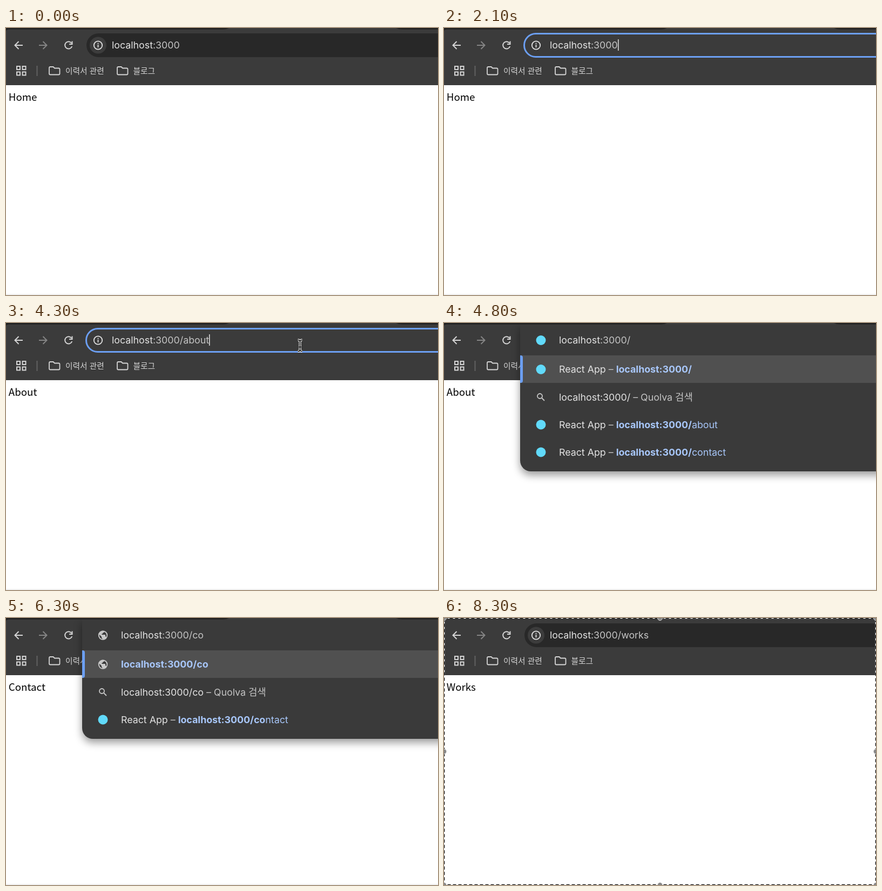
Recreate the animation shown at these times as an HTML page. Size 800 by 495 pixels, loop 9300 ms.

```html
<!DOCTYPE html>
<html lang="ko">
<head>
<meta charset="utf-8">
<title>Browser routing</title>
<style>
  html, body { margin: 0; width: 100%; height: 100%; overflow: hidden; background: #fff; }
  #stage { position: relative; width: 800px; height: 495px; overflow: hidden; }
  #stage svg, #live, #live div, p { position: absolute; }
  #stage svg, #live { left: 0; top: 0; width: 800px; height: 495px; }
  p { margin: 0; font: 17.8px/24px Inter, "Noto Sans CJK KR", sans-serif; color: #e3e3e3; white-space: pre; }
  .page { font: 18.7px/24px "Noto Sans CJK KR", "Noto Sans", sans-serif; color: #000; }
  .mark { font: 14.7px/24px "Noto Sans CJK KR", sans-serif; color: #d5d5d5; }
  .dim { color: #c4c4c4; }
  .link { color: #a8c7fa; }
  .sel { background: #41648f; color: #d3dbe4; }
  .caret { box-shadow: 1.5px 0 #e3e3e3; }
  .bar { left: 149px; top: 10px; width: 680px; height: 44px; border-radius: 22px; background: #282828; }
  .hover { background: #343434; }
  .focus { left: 147px; top: 9px; height: 40px; border: 3px solid #6c9ff3; border-radius: 23px; background: #3b3b3b; }
  .panel { left: 141px; top: 3px; width: 680px; background: #3a3a3a; border-radius: 0 0 0 20px;
           box-shadow: 0 7px 15px rgba(0, 0, 0, .4); clip-path: inset(0 0 -40px -20px); }
  .active { left: 141px; top: 60px; width: 659px; height: 51px; background: #505050; }
  .active::before { content: ""; position: absolute; width: 5px; height: 51px; background: #6c9ff3; border-radius: 0 4px 4px 0; }
</style>
</head>
<body>
<div id="stage">
  <svg fill="none" stroke="#d5d5d5" stroke-width="2">
    <g stroke="none">
      <path fill="#3b3b3b" d="M0 0H800V106H0z"/>
      <path fill="#1f1f1f" d="M0 0H413Q408 2.5 402 2.5H6Q0 2.5 0 6zM722 0H800V2.5H734Q727 2.5 722 0z"/>
      <path fill="#e4e4e4" d="M0 493.5H800v1H0z"/>
    </g>
    <path d="M31 32H17M23.500 25l-7 7 7 7"/>
    <path stroke="#858585" d="M61 32H75M68.500 25l7 7-7 7"/>
    <path d="M121.300 28A6.700 6.700 0 1 0 122.200 34M122.500 24.500V30H117"/>
    <path d="M20 71h6v6h-6zM30.500 71h6v6h-6zM20 81.500h6v6h-6zM30.500 81.500h6v6h-6z"/>
    <path stroke="#626262" d="M57.500 70V89"/>
    <path id="folder" stroke-width="1.800" d="M82 72h5.500l2.500 2.500h7.500q2 0 2 2v8q0 2-2 2H82q-2 0-2-2V74q0-2 2-2z"/>
    <use href="#folder" x="126"/>
  </svg>
  <p class="mark" style="left:110px;top:66.500px">이력서 관련</p>
  <p class="mark" style="left:235.500px;top:66.500px">블로그</p>
  <div id="live"></div>
  <svg id="overlay"></svg>
</div>
<script>
const LOOP = 9300, STEP = 100, HOST = 'localhost', PORT = ':3000';
const ROW_Y = [86, 137.5, 188.5, 239.5];
const live = document.getElementById('live');
const overlay = document.getElementById('overlay');

const timeline = [];
const at = (time, change) => timeline.push([time, change]);
const type = (time, typed, rest = '') => at(time, { mode: 'list', typed, rest });
const visit = (time, page) => at(time, { mode: 'idle', page, path: page === 'Home' ? '' : '/' + page.toLowerCase() });
// Held backspace: one letter per step until only the slash remains.
const erase = (time, path) => {
  for (let n = path.length - 1; n > 0; n--, time += STEP) type(time, path.slice(0, n));
};

visit(0, 'Home');
at(1000, { mode: 'hover' });
at(1400, { mode: 'select' });
at(2000, { mode: 'caret' });
type(2300, '/');
type(2700, '/a', 'bout');
visit(3100, 'About');
at(3700, { mode: 'hover' });
at(4000, { mode: 'select' });
at(4200, { mode: 'caret' });
erase(4400, '/about');
type(4900, '/c', 'ontact');
type(5000, '/con', 'tact');
visit(5100, 'Contact');
at(5700, { mode: 'select' });
at(5800, { mode: 'caret' });
erase(5900, '/contact');
type(6700, '/w', 'orks');
type(6800, '/wo', 'rks');
type(6900, '/wor', 'ks');
visit(7000, 'Works');

// Pointer: start, end, from x, y, to x, y
const moves = [
  [500, 1100, 780, 284, 600, 36], [1100, 1400, 600, 36, 600, 36], [1400, 1600, 600, 36, 790, 145],
  [3500, 3900, 790, 60, 544.5, 42], [3900, 4400, 544.5, 42, 544.5, 42],
  [5700, 5900, 543, 41, 543, 41], [6900, 7500, 543, 41, 543, 41], [7500, 7600, 577, 30, 577, 30]
];

const stateAt = t => Object.assign({}, ...timeline.filter(([time]) => time <= t).map(([, change]) => change));
const text = (x, y, html, cls = '') => `<p class="${cls}" style="left:${x}px;top:${y - 12}px">${html}</p>`;
const span = (cls, html) => `<span class="${cls}">${html}</span>`;
const svg = body => `<svg fill="none" stroke="#c7c7c7">${body}</svg>`;

const appIcon = y => svg(`<circle cx="179.500" cy="${y}" r="9" fill="#61dafb" stroke="none"/>`);
const searchIcon = y => svg(`<g stroke-width="1.800"><circle cx="177.500" cy="${y - 2}" r="4.500"/><path d="M181 ${y + 1.5}l5 5"/></g>`);
const globeIcon = y => svg(`<g transform="translate(179.500 ${y})" stroke="none"><circle r="8.700" fill="#c7c7c7"/>
  <path fill="#3a3a3a" d="M-6.800-1.500L-2.500 2.800V4.500L-1 6.500V7Q-7 5.500-6.800-1.500zM2.500-6.500Q8 -3.500 6.500 3L4.500 2V-1H-2V-3H0V-5H2z"/></g>`);
const infoIcon = disc => svg(`<circle cx="170.500" cy="32" r="15.500" fill="${disc}" stroke="none"/>
  <g stroke="#e3e3e3" stroke-width="1.800"><circle cx="170.500" cy="32" r="7.700"/><path d="M170.500 31v5M170.500 27.800v1.900"/></g>`);

function suggestions({ typed, rest }) {
  const typedUrl = HOST + PORT + typed;
  const app = (path, hit, title = 'React App') => [appIcon,
    title + span('dim', ' – ') + span('link', `<b>${HOST + PORT + hit}</b>${path.slice(hit.length)}`)];
  const search = [searchIcon, typedUrl + span('dim', ' – Quolva 검색')];
  const address = [globeIcon, span('link', `<b>${typedUrl}</b>`)];
  if (typed === '/') return [app('/', '/'), search, app('/about', '/'), app('/contact', '/')];
  if (!rest) {
    const known = ['/about', '/contact'].find(path => path.startsWith(typed));
    return [address, search, app(known, typed)];
  }
  return [app(typed + rest, typed, typed === '/a' ? 'React <b>A</b>pp' : undefined), search, address];
}

function dropdown(state) {
  const rows = suggestions(state);
  const icon = rows[0][0];
  const entry = HOST + span('dim', PORT + state.typed) +
    (state.rest ? span('sel', state.rest) : span('caret', ''));
  return `<div class="panel" style="height:${170 + 51 * (rows.length - 2)}px"></div><div class="active"></div>` +
    icon(32) + text(213, 32, entry) +
    rows.map(([draw, html], i) => draw(ROW_Y[i]) + text(213, ROW_Y[i], html)).join('');
}

function addressBar({ mode, path }) {
  const focused = mode === 'select' || mode === 'caret';
  const tail = PORT + path;
  const url = mode === 'select' ? span('sel', HOST + tail)
    : span(mode, HOST + span('dim', tail));
  const style = focused ? 'focus' : mode === 'hover' ? 'hover' : '';
  return `<div class="bar ${style}"></div>` + infoIcon(focused ? 'none' : '#3c3c3c') +
    text(196, 32, url.replace('class="hover"', ''));
}

function pointer(t, mode) {
  const move = moves.find(([start, end]) => t >= start && t < end);
  if (!move) return '';
  const [start, end, x0, y0, x1, y1] = move;
  const p = (t - start) / (end - start), k = p * p * (3 - 2 * p);
  const x = x0 + (x1 - x0) * k, y = y0 + (y1 - y0) * k;
  if (mode === 'list' || y > 55)
    return `<path transform="translate(${x - 1} ${y - 2})" d="M0 0V19.500L4.500 15.500L7.700 22.500L11 21L8 14H13.500z" fill="#000" stroke="#fff" stroke-width="1.500"/>`;
  const beam = 'M-4-10.500Q0-10.500 0-7.500Q0-10.500 4-10.500M0-8V8M-4 10.500Q0 10.500 0 7.500Q0 10.500 4 10.500M-2.500 2.500H2.500';
  return `<g transform="translate(${x} ${y})" fill="none"><path d="${beam}" stroke="#fff" stroke-width="4"/><path d="${beam}" stroke="#000" stroke-width="1.600"/></g>`;
}

function selectionFrame() {
  const handles = [0, 400, 800].flatMap(x => [0, 247.5, 495].map(y =>
    x === 400 && y === 247.5 ? '' : `<circle cx="${x}" cy="${y}" r="4.500" fill="#858585" stroke="#ddd"/>`));
  const edge = '<rect x=".5" y=".5" width="799" height="494" fill="none" stroke-width="1.500" ';
  return edge + 'stroke="#fff"/>' + edge + 'stroke="#111" stroke-dasharray="6 4"/>' + handles.join('');
}

let shown = -1;
function frame(now) {
  const t = Math.floor(now % LOOP / STEP) * STEP;
  if (t !== shown) {
    shown = t;
    const state = stateAt(t);
    live.innerHTML = text(4.8, 126.5, state.page, 'page') +
      (state.mode === 'list' ? dropdown(state) : addressBar(state));
    overlay.innerHTML = pointer(t, state.mode) + (t >= 8300 ? selectionFrame() : '');
  }
  requestAnimationFrame(frame);
}
frame(performance.now());
</script>
</body>
</html>
```
